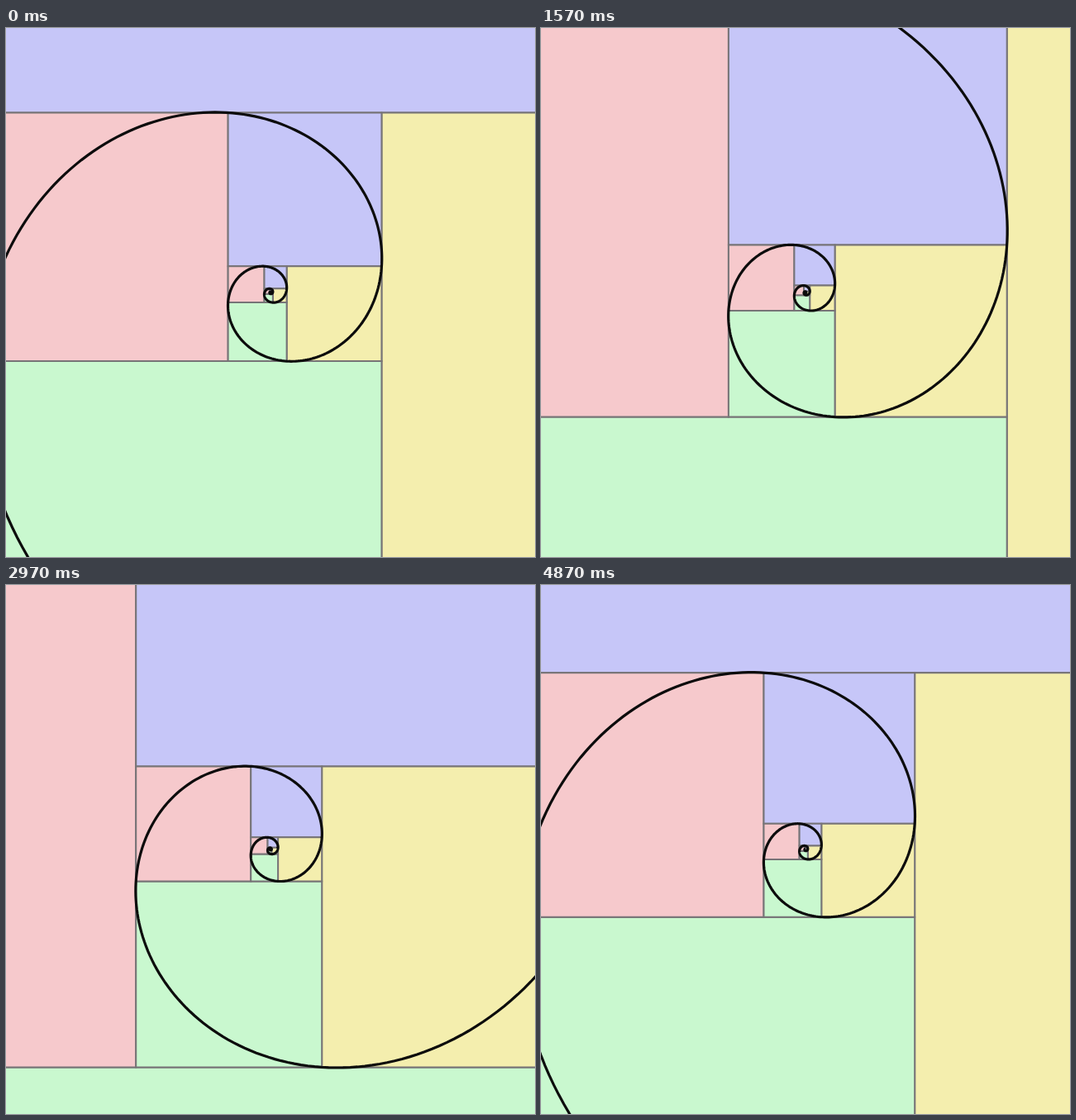
An HTML page with a canvas that plays this animation: 640x640 px, repeating every 4.91 s.

```html
<!DOCTYPE html>
<html lang="en">
<head>
<meta charset="utf-8">
<title>Golden spiral zoom</title>
<style>
  html, body { margin: 0; width: 100%; height: 100%; overflow: hidden; }
  canvas { display: block; width: 100vw; height: 100vh; }
</style>
</head>
<body>
<canvas id="stage" width="640" height="640"></canvas>
<script>
const ctx = document.getElementById('stage').getContext('2d');
const PHI = (1 + Math.sqrt(5)) / 2;
const LOOP = 4910, STEP = 100 / 3, LAST = 146;
const SIDE = 185.8; // side of the base square when the loop begins
const COLORS = ['#c6c6f8', '#f4eeae', '#c9f8cf', '#f6c9cc'];

// Top left corner of the unit square, measured from the spiral's pole
const LEFT = -0.27639, TOP = -1.17082;
const RADIUS = Math.hypot(LEFT, TOP), ANGLE = Math.atan2(TOP, LEFT);
const GROWTH = Math.log(PHI) / (Math.PI / 2);

// Time in ms and logarithm of the zoom
const ZOOM = [[0, 0], [630, 0.2445], [1570, 0.596], [2370, 0.9105],
              [3530, 1.3832], [LOOP, 4 * Math.log(PHI)]];

function zoomAt(t) {
  const i = ZOOM.findIndex(key => key[0] > t);
  const [t0, z0] = ZOOM[i - 1], [t1, z1] = ZOOM[i];
  return Math.exp(z0 + (z1 - z0) * (t - t0) / (t1 - t0));
}

// Each square is the previous one turned a quarter and shrunk by PHI
function drawSquare(k, unit) {
  const side = unit * PHI ** -k;
  const turn = (k + 8) % 4;
  ctx.save();
  ctx.rotate(turn * Math.PI / 2);
  ctx.beginPath();
  ctx.rect(LEFT * side, TOP * side, side, side);
  ctx.fillStyle = COLORS[turn];
  ctx.fill();
  ctx.stroke();
  ctx.restore();
}

function drawSpiral(unit) {
  ctx.beginPath();
  for (let a = -8 * Math.PI; a < 2 * Math.PI; a += 0.03) {
    const r = RADIUS * unit * Math.exp(GROWTH * a);
    ctx.lineTo(r * Math.cos(ANGLE - a), r * Math.sin(ANGLE - a));
  }
  ctx.stroke();
}

function draw(t) {
  const unit = SIDE * zoomAt(t);
  ctx.setTransform(1, 0, 0, 1, 320, 320);
  ctx.lineWidth = 2;
  ctx.strokeStyle = '#777477';
  for (let k = -6; k < 15; k++) drawSquare(k, unit);
  ctx.lineWidth = 3.2;
  ctx.strokeStyle = '#0c0c0c';
  drawSpiral(unit);
}

const begin = performance.now();
function tick() {
  const t = (performance.now() - begin) % LOOP;
  draw(Math.min(LAST, Math.floor((t + 3.4) / STEP)) * STEP);
  requestAnimationFrame(tick);
}
tick();
</script>
</body>
</html>
```
